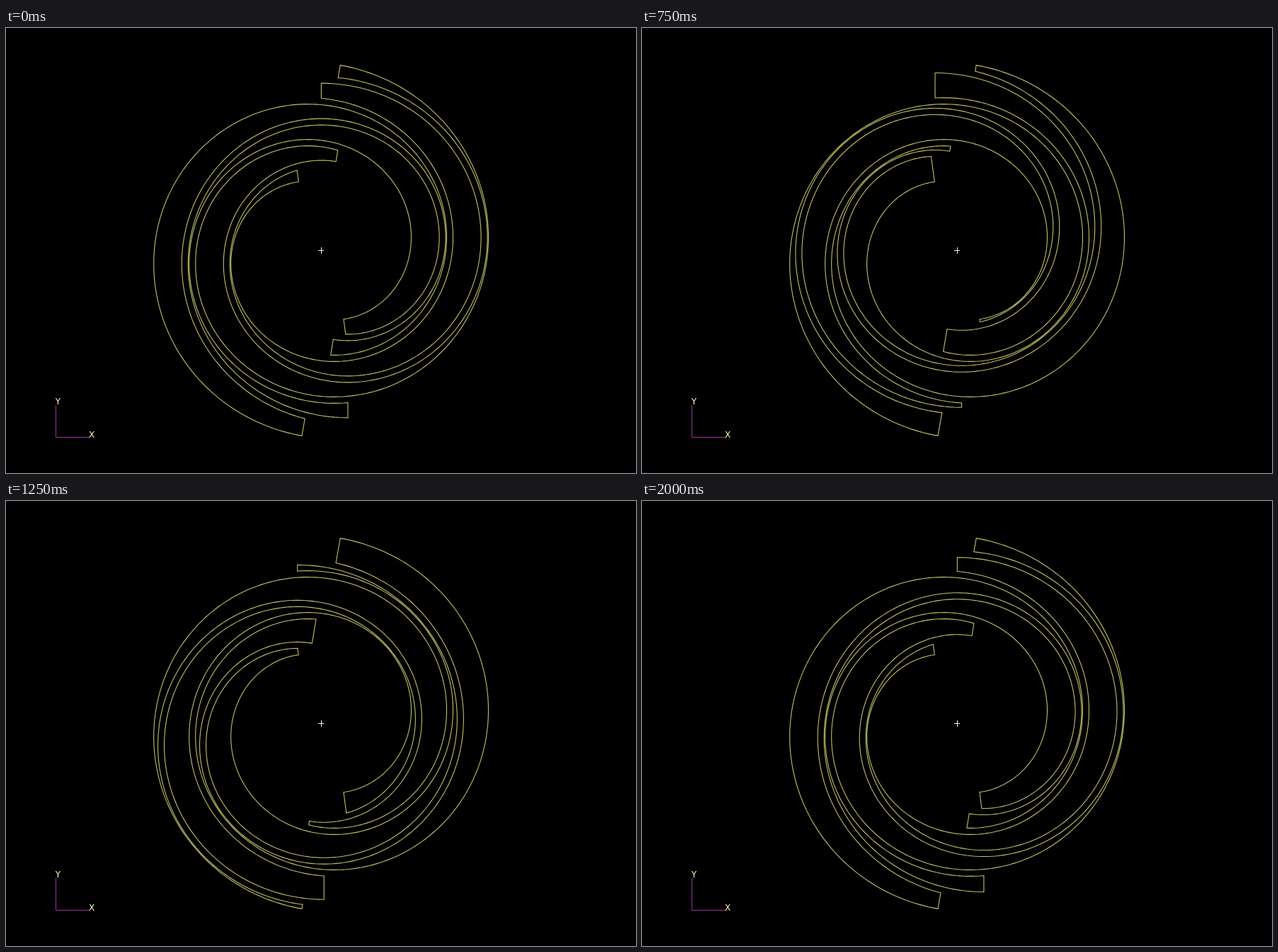
An HTML page for the animation above (2250 ms loop, 890x629 px).

```html
<!DOCTYPE html>
<html lang="en">
<head>
<meta charset="utf-8">
<title>Orbiting scroll</title>
<style>
  html, body { margin: 0; width: 100%; height: 100%; overflow: hidden; background: #000; }
  svg { display: block; width: 890px; height: 629px; }
  path { fill: none; stroke-width: 1; }
  .pocket { stroke: #c0c066; stroke-width: 1.1; }
  .cross { stroke: #ffffd0; }
  .axes { stroke: #a030a0; }
  text { font: 12px "DejaVu Sans", Verdana, sans-serif; fill: #ffffb4; text-anchor: middle; }
</style>
</head>
<body>
<svg viewBox="0 0 890 629">
  <g id="scroll" transform="translate(445.1 314.5)"></g>
  <path class="cross" d="M441 314.5H449M445.5 310V319"/>
  <path class="axes" d="M70.5 533V578.5H118"/>
  <text x="73.5" y="531.5">Y</text>
  <text x="121" y="579">X</text>
</svg>
<script>
  const STEP = 250, STEPS = 9;
  const BASE = 18.78;      // radius of the involute's base circle
  const ORBIT = 19.1;      // orbit radius of the moving wraps
  const MID = 20.5;        // wall distance when the wraps are centred
  const OUTER = 236.4, INNER = 186.4;
  const UP = -Math.PI / 2, TURN = 2 * Math.PI;
  const STILL = [0, 0];

  // Involute point whose outward normal has angle a
  function point(wall, a) {
    const h = wall.h - BASE * a, c = Math.cos(a), s = Math.sin(a);
    return [h * c + BASE * s + wall.shift[0], h * s - BASE * c + wall.shift[1]];
  }

  // Angle at which a wall meets the other wall's normal at angle a
  function meet(wall, other, a) {
    const [px, py] = point(other, a);
    let b = a;
    for (let i = 0; i < 8; i++) {
      const [x, y] = point(wall, b);
      b -= ((py - y) * -Math.cos(a) + (px - x) * Math.sin(a)) / (wall.h - BASE * b);
    }
    return b;
  }

  function trace(wall, from, to) {
    const n = 240, out = [];
    for (let i = 0; i <= n; i++) {
      const [x, y] = point(wall, from + (to - from) * i / n);
      out.push(x.toFixed(2) + " " + y.toFixed(2));
    }
    return out.join("L");
  }

  // Pocket between wall u, which is cut square at a, and wall v, cut square at b
  function pocket(u, v, a, b) {
    return "M" + trace(u, a, meet(u, v, b)) + "L" + trace(v, b, meet(v, u, a)) + "Z";
  }

  function pockets(shift) {
    return pocket({ h: OUTER, shift: STILL }, { h: OUTER - MID, shift }, UP + 0.1745, UP + TURN + 0.165) +
      pocket({ h: INNER + MID, shift }, { h: INNER, shift: STILL }, UP, UP + TURN - 0.132);
  }

  const svgNS = "http://www.w3.org/2000/svg";
  const halves = [0, 180].map(turn => {
    const path = document.createElementNS(svgNS, "path");
    path.setAttribute("class", "pocket");
    path.setAttribute("transform", `rotate(${turn})`);
    document.getElementById("scroll").append(path);
    return path;
  });

  let shown = -1;
  function draw(now) {
    const step = Math.floor(now / STEP) % STEPS;
    if (step !== shown) {
      shown = step;
      const angle = (step ? 45 * step - 5 : 0) * Math.PI / 180;
      const x = ORBIT * Math.cos(angle), y = -ORBIT * Math.sin(angle);
      halves[0].setAttribute("d", pockets([x, y]));
      halves[1].setAttribute("d", pockets([-x, -y]));
    }
  }

  const start = performance.now();
  function tick() {
    draw(performance.now() - start);
    requestAnimationFrame(tick);
  }
  tick();
</script>
</body>
</html>
```
